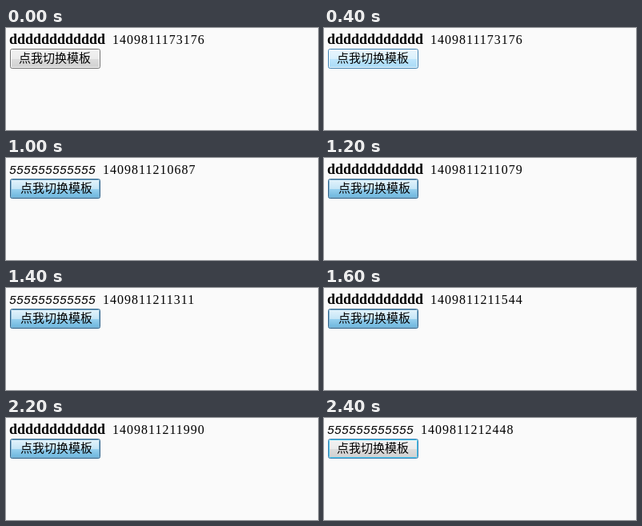
Animation, 390 px wide and 128 px high, one loop 3000 ms. Source, as an HTML page:

```html
<!DOCTYPE html>
<html lang="zh-CN">
<head>
<meta charset="utf-8">
<title>切换模板</title>
<style>
  html, body { margin: 0; width: 100%; height: 100%; overflow: hidden; background: #fafafa; }
  svg { display: block; }
  text { white-space: pre; fill: #000; }
  .bold { font: bold 18px "Liberation Serif", "Times New Roman", serif; }
  .italic { font: italic 15px "Liberation Mono", "Courier New", monospace; }
  .stamp { font: 16px "Liberation Serif", "Times New Roman", serif; letter-spacing: 1px; }
  .label { font: 15px "Noto Sans CJK SC", "Noto Sans CJK", sans-serif; }
</style>
</head>
<body>
<svg width="390" height="128" viewBox="0 0 390 128">
  <defs>
    <linearGradient id="face" x1="0" y1="0" x2="0" y2="1">
      <stop offset="0"/><stop offset=".52"/><stop offset=".52"/><stop offset="1"/>
    </linearGradient>
  </defs>
  <text id="word" x="4" y="20"></text>
  <text id="stamp" class="stamp" y="20"></text>
  <rect id="border" x="5.5" y="26.5" width="112" height="24" rx="2" fill="url(#face)"/>
  <rect id="inner" x="6.5" y="27.5" width="110" height="22" rx="1" fill="none"/>
  <text id="label" class="label" y="43">点我切换模板</text>
</svg>
<script>
const LOOP = 3000;
const $ = id => document.getElementById(id);
const stops = document.querySelectorAll('#face stop');

const looks = {
  normal:  { border: '#707070', inner: '#fcfcfc', face: ['#f2f2f2', '#ebebeb', '#dddddd', '#cfcfcf'] },
  hover:   { border: '#3c7fb1', inner: '#f4fbfe', face: ['#eaf6fd', '#d9f0fc', '#bee6fd', '#a7d9f5'] },
  pressed: { border: '#2c628b', inner: '#86b4cf', face: ['#e5f4fc', '#c4e5f6', '#98d1ef', '#68b3db'] },
  focused: { border: '#3c7fb1', inner: '#48c8ee', face: ['#f2f2f2', '#ebebeb', '#dddddd', '#cfcfcf'] }
};

// Each click is pressed, then released; the release swaps the template.
const start = 1409811173176;
const clicks = [
  { down: 600,  up: 700,  stamp: 1409811210687 },
  { down: 1000, up: 1100, stamp: 1409811211079 },
  { down: 1200, up: 1300, stamp: 1409811211311 },
  { down: 1400, up: 1500, stamp: 1409811211544 },
  { down: 1600, up: 1700, stamp: 1409811211751 },
  { down: 1800, up: 1900, stamp: 1409811211990 },
  { down: 2200, up: 2300, stamp: 1409811212448 }
];
const enter = 400, leave = 2400;

function lookAt(t) {
  if (t < enter) return 'normal';
  if (t >= leave) return 'focused';
  return clicks.some(c => t >= c.down && t < c.up) ? 'pressed' : 'hover';
}

function drawText(t) {
  const done = clicks.filter(c => t >= c.up);
  const italic = done.length % 2 === 1;
  $('word').textContent = (italic ? '5' : 'd').repeat(12);
  $('word').setAttribute('class', italic ? 'italic' : 'bold');
  $('stamp').textContent = done.length ? done[done.length - 1].stamp : start;
  $('stamp').setAttribute('x', italic ? 121 : 133);
}

function drawButton(name) {
  const look = looks[name];
  stops.forEach((s, i) => s.setAttribute('stop-color', look.face[i]));
  $('border').setAttribute('stroke', look.border);
  $('inner').setAttribute('stroke', look.inner);
  $('label').setAttribute('x', name === 'pressed' ? 18 : 16);
}

function draw(t) {
  drawText(t);
  drawButton(lookAt(t));
}

const begin = performance.now();
function tick() {
  draw((performance.now() - begin) % LOOP);
  requestAnimationFrame(tick);
}
tick();
</script>
</body>
</html>
```
